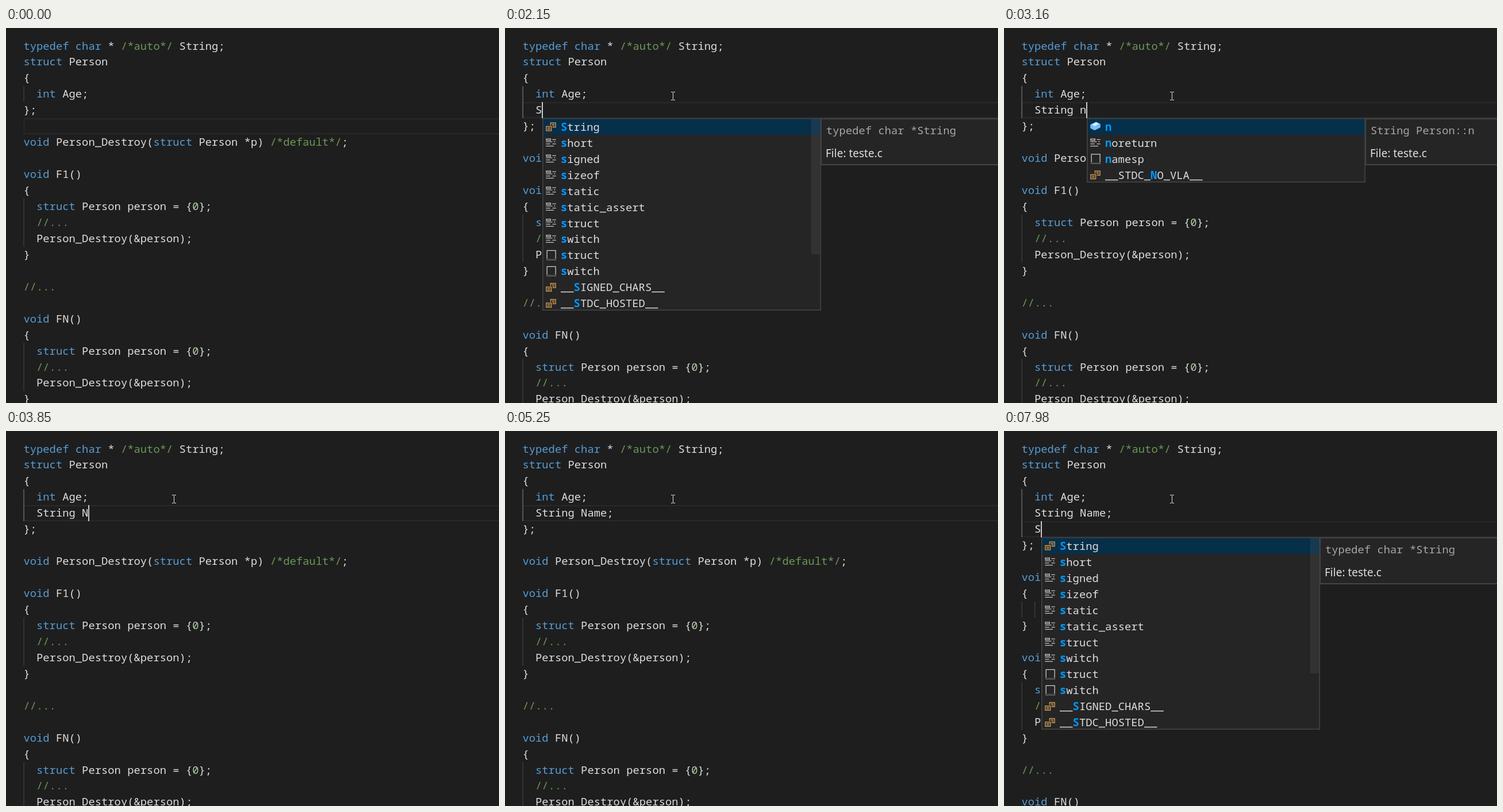
Animation, 858 px wide and 653 px high, one loop 8 s. Source, as an HTML page with a canvas:

```html
<!DOCTYPE html>
<html lang="en">
<head>
<meta charset="utf-8">
<title>Code editor</title>
<style>
  html, body { margin: 0; height: 100%; overflow: hidden; background: #1e1e1e; }
  canvas { display: block; }
</style>
</head>
<body>
<canvas id="stage" width="858" height="653"></canvas>
<script>
const ctx = document.getElementById('stage').getContext('2d');
const LOOP = 8000, LEFT = 30.4, TOP = 17.3, CHAR = 11.3, LINE = 27.95;
const MONO = '18.8px "Noto Sans Mono", monospace';
const SANS = '19px "Noto Sans", sans-serif';
const TEXT = '#dedede', KEYWORD = '#569cd6', COMMENT = '#6a9955', NUMBER = '#b5cea8';
const MATCH = '#0097fb', MENU = '#252526', EDGE = '#454545', SELECTED = '#062f4a';

const HEAD = ['typedef char * /*auto*/ String;', 'struct Person', '{', '  int Age;'];
const DESTROY = 'void Person_Destroy(struct Person *p) /*default*/';
const BODY = ['{', '    free((void*)p->Name);', '}'];
const fn = name => [`void ${name}()`, '{', '  struct Person person = {0};',
  '  //...', '  Person_Destroy(&person);', '}'];

// [time, fields typed after Age, caret visible, menu open, detail open]
const STEPS = [
  [0, '', 0], [730, '', 1], [1280, '', 0], [1670, '  ', 1],
  [2060, '  S', 1], [2140, '  S', 1, 1, 1], [2220, '  St', 1, 1, 1], [2310, '  Str', 1, 1, 1],
  [2390, '  Stri', 1, 1, 1], [2460, '  Strin', 1, 1, 1], [2540, '  String', 1, 1, 1],
  [2770, '  String ', 1], [3080, '  String n', 1], [3160, '  String n', 1, 1, 1],
  [3540, '  String ', 1], [3850, '  String N', 1], [3930, '  String N', 1, 1, 1],
  [4000, '  String Na', 1, 1, 1], [4080, '  String Nam', 1, 1, 1], [4160, '  String Name', 1, 1, 1],
  [4690, '  String Name;', 1], [5250, '  String Name;', 0], [5790, '  String Name;', 1],
  [6260, '  String Name;', 0], [6720, '  String Name;', 1], [7270, '  String Name;', 0],
  [7360, '  String Name;\n  ', 1], [7820, '  String Name;\n  S', 1],
  [7900, '  String Name;\n  S', 1, 1], [7980, '  String Name;\n  S', 1, 1, 1]
];

// The first letter is the kind: type, keyword, snippet or variable
const S_ITEMS = ['tString', 'kshort', 'ksigned', 'ksizeof', 'kstatic', 'kstatic_assert', 'kstruct',
  'kswitch', 'sstruct', 'sswitch', 't__SIGNED_CHARS__', 't__STDC_HOSTED__'];
const N_ITEMS = ['knoreturn', 'snamesp', 't__STDC_NO_VLA__'];

const rowTop = row => TOP + row * LINE;
const colX = col => LEFT + col * CHAR;

function rect(x, y, w, h, color) {
  ctx.fillStyle = color;
  ctx.fillRect(x, y, w, h);
}

// Border of the given thickness, drawn inside the box
function frame(x, y, w, h, color, size) {
  ctx.strokeStyle = color;
  ctx.lineWidth = size;
  ctx.strokeRect(x + size / 2, y + size / 2, w - size, h - size);
}

function shape(points, color) {
  ctx.fillStyle = color;
  ctx.beginPath();
  points.forEach(([x, y]) => ctx.lineTo(x, y));
  ctx.fill();
}

function mono(text, x, y, color, weight = 500) {
  ctx.font = `${weight} ${MONO}`;
  ctx.fillStyle = color;
  [...text].forEach((c, i) => ctx.fillText(c, x + i * CHAR, Math.round(y)));
}

function codeLine(text, x, y) {
  const tokens = /(\/\*.*?\*\/|\/\/.*)|\b(typedef|char|struct|int|void)\b|\b(0)\b|[^\s\/]/g;
  for (const m of text.matchAll(tokens)) {
    const color = m[1] ? COMMENT : m[2] ? KEYWORD : m[3] ? NUMBER : TEXT;
    mono(m[0], x + m.index * CHAR, y, color);
  }
}

// Icons live on a 16-unit grid
const icons = {
  t() {
    const color = '#e0a556';
    frame(7, 2, 8, 7, color, 1);
    rect(9, 4, 4, 1, color);
    rect(9, 6, 4, 1, color);
    rect(0, 6, 10, 9, MENU);
    frame(1, 7, 8, 7, color, 1);
    rect(3, 9, 4, 1, color);
    rect(3, 11, 4, 1, color);
  },
  k() {
    const color = '#c5c5c5';
    frame(1, 2, 7, 3, color, 1);
    [[10, 3, 5], [1, 6, 9], [12, 6, 2], [1, 9, 6], [10, 9, 5], [1, 12, 11]]
      .forEach(([x, y, w]) => rect(x, y, w, 1, color));
  },
  s() {
    const color = '#d0d0d0';
    rect(2, 1, 13, 12, color);
    rect(3, 2, 11, 11, MENU);
    for (let x = 2; x < 15; x += 2) rect(x, 14, 1, 1, color);
  },
  v() {
    shape([[1, 5], [9, 1], [15, 4], [15, 9], [7, 13], [1, 10]], '#75beff');
    shape([[3.2, 5], [9, 2.1], [12.8, 4], [7, 6.9]], '#e4f1fd');
  }
};

function drawIcon(kind, x, mid) {
  ctx.save();
  ctx.translate(x, mid - 10);
  ctx.scale(1.25, 1.25);
  icons[kind]();
  ctx.restore();
}

// Positions of the typed letters inside a label, or null if one is missing
function matchLetters(label, word) {
  const hits = new Set();
  for (const c of word.toLowerCase()) {
    const i = [...label.toLowerCase()].findIndex((l, k) => l === c && !hits.has(k));
    if (i < 0) return null;
    hits.add(i);
  }
  return hits;
}

function drawDetail(label, x, y) {
  const snippet = label === 'namesp';
  if (!snippet && label !== 'String' && label.length > 1) return;
  const h = snippet ? 191 : 82;
  rect(x, y, 858 - x, h, MENU);
  frame(x, y, 900 - x, h, EDGE, 2);
  const tx = x + 10;
  const title = snippet ? 'Code snippet for' : label === 'String' ? 'typedef char *String' : 'String Person::' + label;
  mono(title, tx, y + 27.5, '#a6a6a6');
  if (snippet) {
    ['namespace name', '{', '', '} // name'].forEach((s, i) => codeLine(s, tx, y + 94 + i * 27.6));
  } else {
    ctx.font = SANS;
    ctx.fillStyle = TEXT;
    ctx.fillText('File: teste.c', tx - 1, Math.round(y + 68));
  }
}

function drawMenu(word, x, y, detail) {
  const all = word[0] === 'S' ? S_ITEMS : ['v' + word[0], ...N_ITEMS];
  const items = all.filter(item => matchLetters(item.slice(1), word));
  const w = 485, h = Math.round(items.length * LINE);
  rect(x, y, w, h, MENU);
  rect(x, y + 1, w, LINE, SELECTED);
  items.forEach((item, i) => {
    const label = item.slice(1), hits = matchLetters(label, word), mid = y + 15 + i * LINE;
    drawIcon(item[0], x + 5, mid);
    [...label].forEach((c, k) => {
      const hit = hits.has(k);
      mono(c, x + 32 + k * CHAR, mid + 6.8, hit ? MATCH : TEXT, hit ? 700 : 500);
    });
  });
  if (items.length > 11) rect(x + w - 17, y + 1, 15, 236, 'rgba(121,121,121,.15)');
  frame(x, y, w, h, EDGE, 1.5);
  if (detail) drawDetail(items[0].slice(1), x + w - 1, y);
}

function drawMouse(t) {
  if (t < 70) return;
  const k = Math.min(7, Math.floor((t - 70) / 72.8));
  const rest = (1 - k / 7) ** 2;
  const nudge = t >= 730 && t < 900 ? (t < 815 ? 1 : .5) : 0;
  const x = Math.round(292 + 411 * rest + 9 * nudge);
  const y = Math.round(118 + 495 * rest + 6 * nudge);
  rect(x, y - 6, 1, 13, '#e4e4e4');
  for (const end of [-7, 7]) {
    rect(x - 3, y + end, 3, 1, '#e4e4e4');
    rect(x + 1, y + end, 3, 1, '#e4e4e4');
  }
}

function draw(t) {
  const [, typed, caret, menu, detail] = STEPS.findLast(step => step[0] <= t);
  const fields = typed ? typed.split('\n') : [];
  const saved = t >= 6020;
  const lines = [...HEAD, ...fields, '};', '', DESTROY + (saved ? '' : ';'),
    ...(saved ? BODY : []), '', ...fn('F1'), '', '//...', '', ...fn('FN')];
  const row = t < 730 ? 5 : 3 + fields.length;
  const current = lines[row];
  const caretX = colX(current.length);

  rect(0, 0, 858, 653, '#1e1e1e');
  frame(LEFT, rowTop(row), 900, LINE, '#292929', 2);
  lines.forEach((text, i) => {
    const indent = text.search(/\S|$/);
    const active = t >= 730 && i <= row;
    for (let col = 0; col < indent; col += 2) {
      rect(colX(col), rowTop(i), 1.3, LINE, active ? '#707070' : '#404040');
    }
    codeLine(text, LEFT, rowTop(i) + 20.2);
  });
  if (caret) rect(Math.floor(caretX), Math.round(rowTop(row)), 2, 28, '#c8c8c6');
  if (menu) drawMenu(current.match(/\w+$/)[0], Math.round(caretX + .5), Math.round(rowTop(row + 1)), detail);
  drawMouse(t);
}

function tick() {
  draw(performance.now() % LOOP);
  requestAnimationFrame(tick);
}
tick();
</script>
</body>
</html>
```
